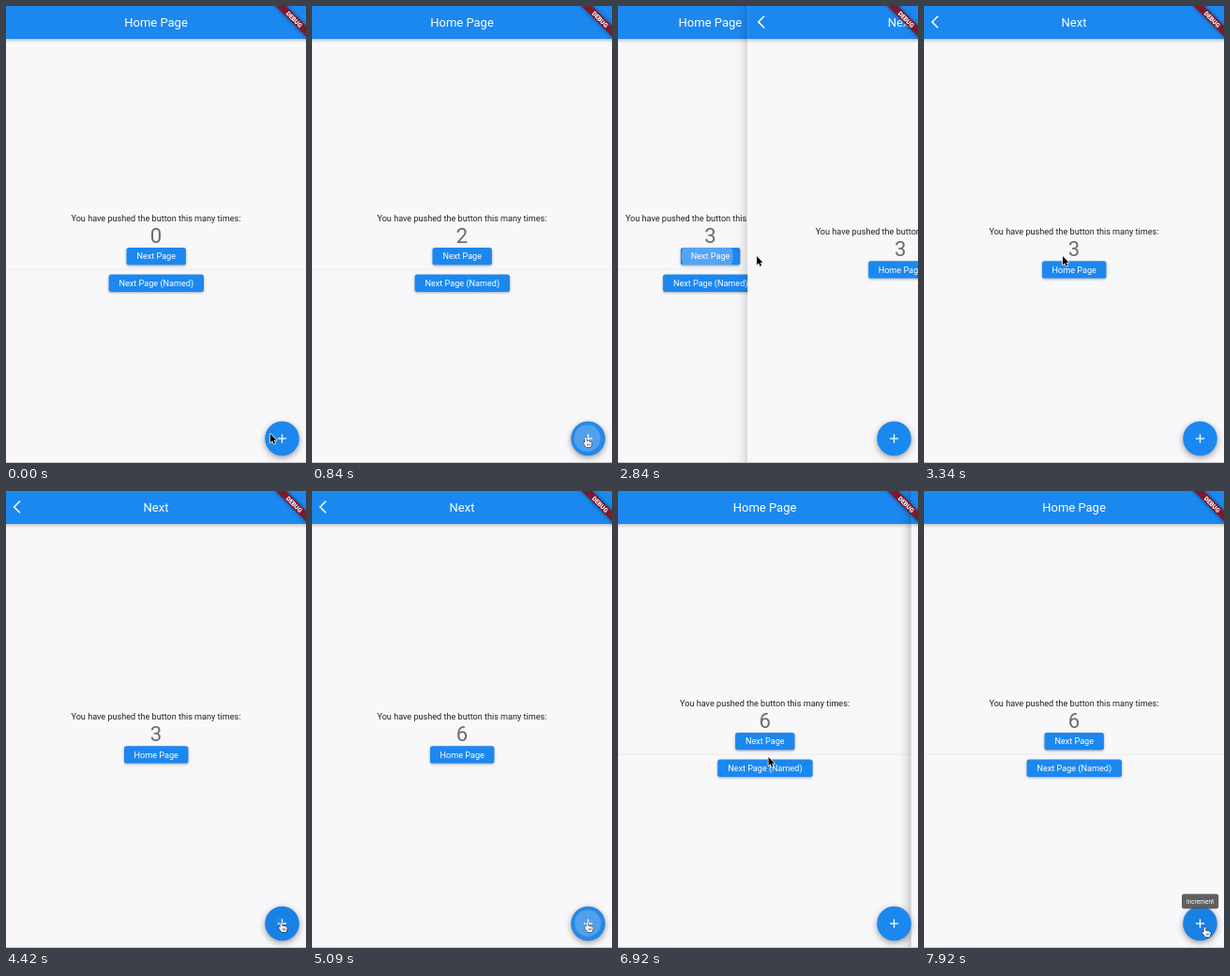
Write an HTML page with a canvas that moves like this. It is 320 px wide and 486 px high and loops after 8 s.

```html
<!DOCTYPE html>
<html lang="en">
<head>
<meta charset="utf-8">
<title>Counter pages</title>
<style>
html, body { margin: 0; width: 100%; height: 100%; overflow: hidden; background: #f8f7f9; }
canvas { display: block; width: 320px; height: 486px; }
</style>
</head>
<body>
<canvas id="stage"></canvas>
<script>
const LOOP = 8000, STEP = 1000 / 12;
const W = 320, H = 486;
// The app window reaches a little past the stage on every side.
const LEFT = -3, TOP = -1.4, PAGE = 326, BAR = 36.4;
const BLUE = '#1b88f0', PAPER = '#f8f7f9';
const FAB = { x: 294.5, y: 460, r: 18.3 };
const NEXT = { x: 128.5, y: 257, w: 63.4, h: 18.3, label: 'Next Page' };
const NAMED = { x: 109.6, y: 285.6, w: 101.4, h: 18.3, label: 'Next Page (Named)' };
const HOME = { x: 126, y: 271.2, w: 68.4, h: 18.3, label: 'Home Page' };

const PUSH = 2744, POP = 6655, SLIDE = 400;
const TAPS = [500, 750, 1000, 4500, 4750, 5000];
const TIPS = [[90, 400], [3740, 4410], [7740, 9000]];
const PATH = [
  [0, 282, 455], [170, 292, 459], [1120, 292, 459], [1670, 288, 377],
  [2420, 148, 266], [3340, 148, 266], [3850, 293.5, 458.7], [5080, 293.5, 458.7],
  [5880, 160.5, 283], [7330, 160.5, 283], [7840, 299.5, 464], [8000, 299.5, 464]
];
const ARROW = new Path2D('M0 0V9.2L2.1 7.3L3.6 10.7L5.1 10L3.7 6.8H6.5Z');
const HAND = new Path2D('M-1 .9C-1-.4 1-.4 1 .9V4.2C1.6 3.4 2.8 3.6 2.9 4.5C3.5 3.8 4.7 4.1 4.7 5' +
  'C5.4 4.5 6.3 4.9 6.3 5.8C6.3 8 5.6 8.6 5.4 10.2H.3C-.3 8.6-1.8 7.6-2.5 6C-2.9 5-1.7 4.5-1 5.4Z');

const canvas = document.getElementById('stage');
const ctx = canvas.getContext('2d');
const dpr = window.devicePixelRatio || 1;
canvas.width = W * dpr;
canvas.height = H * dpr;

const clamp = v => Math.min(1, Math.max(0, v));
const mix = (a, b, k) => a + (b - a) * k;
const smooth = k => k * k * (3 - 2 * k);

function bezier(x1, y1, x2, y2) {
  const at = (a, b, u) => 3 * (1 - u) * (1 - u) * u * a + 3 * (1 - u) * u * u * b + u * u * u;
  return x => {
    if (x <= 0 || x >= 1) return clamp(x);
    let lo = 0, hi = 1;
    for (let i = 0; i < 24; i++) {
      const mid = (lo + hi) / 2;
      if (at(x1, x2, mid) < x) lo = mid; else hi = mid;
    }
    return at(y1, y2, lo);
  };
}
const glide = bezier(.35, .91, .33, .97);
const ease = bezier(.25, .1, .25, 1);

function shadow(alpha, blur, dy) {
  ctx.shadowColor = `rgba(0,0,0,${alpha})`;
  ctx.shadowBlur = blur * dpr;
  ctx.shadowOffsetY = dy * dpr;
}

function text(str, x, y, size, color, weight = 400) {
  ctx.font = `${weight} ${size}px Roboto, sans-serif`;
  ctx.textAlign = 'center';
  ctx.fillStyle = color;
  ctx.fillText(str, x, y);
}

function disc(x, y, r, color) {
  ctx.fillStyle = color;
  ctx.beginPath();
  ctx.arc(x, y, r, 0, 7);
  ctx.fill();
}

function box(b, color, r = 2.6) {
  ctx.fillStyle = color;
  ctx.beginPath();
  ctx.roundRect(b.x, b.y, b.w, b.h, r);
  ctx.fill();
}

// Ink spreads slowly while held, then fills the shape after release.
function ripple(t, down, up, from, to, radius, strength) {
  if (t < down || t > up + 375) return;
  const held = .15 * clamp((Math.min(t, up) - down) / 150);
  const k = t < up ? held : mix(held, 1, ease(clamp((t - up) / 225)));
  const alpha = strength * clamp((t - down) / 75) * (1 - clamp((t - up - 225) / 150));
  disc(mix(from.x, to.x, k), mix(from.y, to.y, k), radius * mix(.3, 1, k), `rgba(255,255,255,${alpha})`);
}

function cursorAt(t) {
  let i = 1;
  while (i < PATH.length - 1 && t > PATH[i][0]) i++;
  const [t0, x0, y0] = PATH[i - 1], [t1, x1, y1] = PATH[i];
  const k = smooth(clamp((t - t0) / (t1 - t0)));
  return { x: mix(x0, x1, k), y: mix(y0, y1, k) };
}

const inside = (p, b) => p.x > b.x && p.x < b.x + b.w && p.y > b.y && p.y < b.y + b.h;
const onFab = p => Math.hypot(p.x - FAB.x, p.y - FAB.y) < FAB.r;

function button(b, t, hover, press) {
  ctx.save();
  shadow(.32, 2.6, 1.1);
  box(b, BLUE);
  ctx.restore();
  if (hover) box(b, 'rgba(255,255,255,.08)');
  if (press) {
    ctx.save();
    ctx.beginPath();
    ctx.roundRect(b.x, b.y, b.w, b.h, 2.6);
    ctx.clip();
    const mid = { x: b.x + b.w / 2, y: b.y + b.h / 2 };
    ripple(t, press.down, press.up, press.at, mid, 34, .24);
    ctx.restore();
  }
  text(b.label, b.x + b.w / 2, b.y + 12.4, 9.1, '#fff');
}

function page(dx, title, drop, count, content) {
  ctx.save();
  ctx.translate(dx, 0);
  ctx.beginPath();
  ctx.rect(LEFT, TOP, PAGE, H + 6);
  ctx.clip();
  ctx.fillStyle = PAPER;
  ctx.fillRect(LEFT, TOP, PAGE, H + 6);
  content();
  text('You have pushed the button this many times:', 160, 228.8 + drop, 9.1, '#222');
  text(count, 160, 251.8 + drop, 22.1, '#6c6b6d');
  ctx.save();
  shadow(.3, 4, 1.3);
  ctx.fillStyle = BLUE;
  ctx.fillRect(LEFT, TOP, PAGE, BAR);
  ctx.restore();
  text(title, 160, 21.6, 13, '#fff');
  ctx.restore();
}

function homePage(dx, t, count, hot) {
  page(dx, 'Home Page', 0, count, () => {
    ctx.fillStyle = '#e7e6e9';
    ctx.fillRect(LEFT, 279.7, PAGE, .8);
    button(NEXT, t, hot === NEXT, { down: 2600, up: PUSH, at: { x: 148, y: 266 } });
    button(NAMED, t, hot === NAMED);
  });
}

function nextPage(dx, t, count, hot, shade) {
  const edge = LEFT + dx;
  if (shade > 0 && dx > 0) {
    const g = ctx.createLinearGradient(edge - 16.3, 0, edge, 0);
    [[0, 0], [.3, .016], [.6, .07], [1, .22]].forEach(([at, a]) =>
      g.addColorStop(at, `rgba(0,0,0,${a * shade})`));
    ctx.fillStyle = g;
    ctx.fillRect(edge - 16.3, 0, 16.3, H);
  }
  page(dx, 'Next', 14.4, count, () =>
    button(HOME, t, hot === HOME, { down: 6560, up: POP, at: { x: 160.5, y: 283 } }));
  ctx.strokeStyle = '#fff';
  ctx.lineWidth = 1.6;
  ctx.beginPath();
  ctx.moveTo(dx + 14.9, 10.8);
  ctx.lineTo(dx + 8.7, 17);
  ctx.lineTo(dx + 14.9, 23.2);
  ctx.stroke();
}

function drawFab(t, hover) {
  ctx.save();
  shadow(.38, 6.5, 2.2);
  disc(FAB.x, FAB.y, FAB.r, BLUE);
  ctx.restore();
  if (hover) disc(FAB.x, FAB.y, FAB.r, 'rgba(0,0,0,.05)');
  ctx.save();
  ctx.beginPath();
  ctx.arc(FAB.x, FAB.y, FAB.r, 0, 7);
  ctx.clip();
  for (const up of TAPS) ripple(t, up - 100, up, cursorAt(up), FAB, FAB.r, .2);
  ctx.restore();
  ctx.fillStyle = '#fff';
  ctx.fillRect(FAB.x - 4.6, FAB.y - .65, 9.2, 1.3);
  ctx.fillRect(FAB.x - .65, FAB.y - 4.6, 1.3, 9.2);
}

function drawTip(t) {
  const tip = TIPS.find(([on, off]) => t >= on && t < off);
  if (!tip) return;
  ctx.save();
  ctx.globalAlpha = clamp((t - tip[0]) / 150);
  box({ x: 275, y: 428.6, w: 39.2, h: 15.6 }, 'rgba(84,84,86,.92)');
  text('Increment', 294.5, 438.8, 6.5, '#fff');
  ctx.restore();
}

function drawRibbon() {
  ctx.save();
  ctx.translate(LEFT + PAGE, TOP);
  ctx.rotate(Math.PI / 4);
  ctx.save();
  shadow(.5, 4, 0);
  ctx.fillStyle = '#7c1a2b';
  ctx.fillRect(-26, 18.2, 52, 7.8);
  ctx.restore();
  text('DEBUG', 0, 24.5, 6.6, '#fff', 900);
  ctx.restore();
}

function drawCursor(p, hand) {
  const shape = hand ? HAND : ARROW;
  ctx.save();
  ctx.translate(p.x, p.y);
  ctx.lineJoin = 'round';
  ctx.lineWidth = hand ? .9 : 1.4;
  ctx.strokeStyle = hand ? '#000' : '#fff';
  ctx.fillStyle = hand ? '#fff' : '#000';
  ctx.stroke(shape);
  ctx.fill(shape);
  if (hand) {
    ctx.beginPath();
    for (const x of [1.6, 3, 4.4]) {
      ctx.moveTo(x, 6.4);
      ctx.lineTo(x, 8.6);
    }
    ctx.lineWidth = .5;
    ctx.stroke();
  }
  ctx.restore();
}

function draw(t) {
  ctx.setTransform(dpr, 0, 0, dpr, 0, 0);
  ctx.fillStyle = PAPER;
  ctx.fillRect(0, 0, W, H);

  const count = String(TAPS.filter(up => t >= up).length);
  const pushed = (t - PUSH) / SLIDE, popped = (t - POP) / SLIDE;
  const shown = t < POP ? glide(clamp(pushed)) : 1 - glide(clamp(popped));
  const shade = t < POP ? shown : glide(clamp(1 - popped));

  const p = cursorAt(t);
  const targets = shown === 0 ? [NEXT, NAMED] : shown === 1 ? [HOME] : [];
  const hot = targets.find(b => inside(p, b));
  const fabHot = t > 50 && onFab(p);

  if (shown < 1) homePage(-shown * PAGE / 3, t, count, hot);
  if (shown > 0) nextPage((1 - shown) * PAGE, t, count, hot, shade);
  drawFab(t, fabHot);
  drawTip(t);
  drawRibbon();
  ctx.fillStyle = '#c6c5c8';
  ctx.fillRect(0, H - 1, W, 1);
  drawCursor(p, hot || fabHot);
}

const start = performance.now();
function tick() {
  const t = (performance.now() - start) % LOOP;
  draw(Math.floor(t / STEP) * STEP);
  requestAnimationFrame(tick);
}
tick();
</script>
</body>
</html>
```
